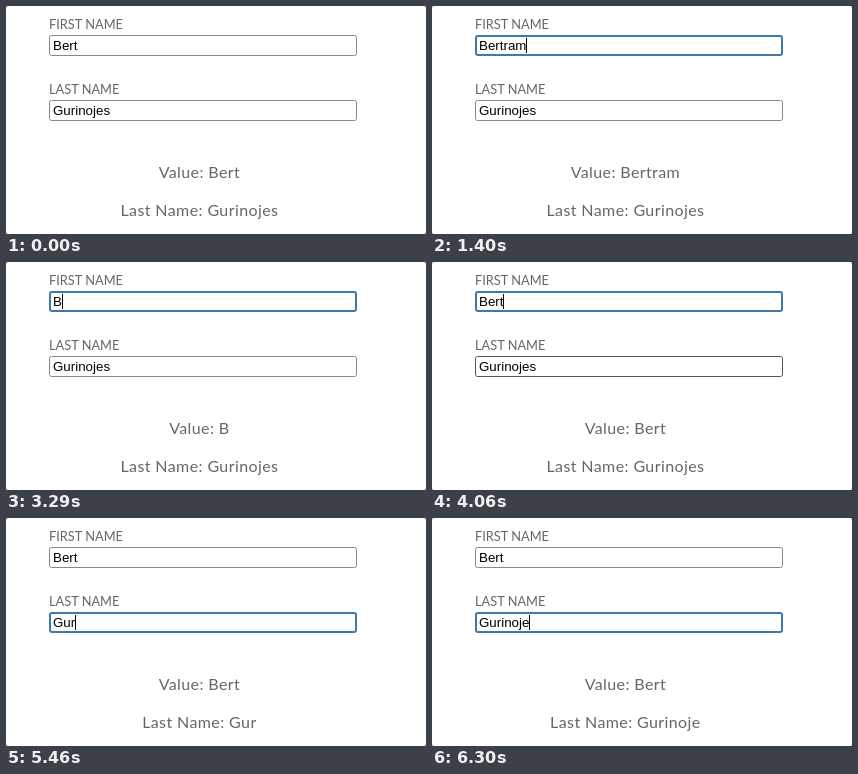
Write an HTML page that moves like this. It is 420 px wide and 228 px high and loops after 6.37 s.

```html
<!DOCTYPE html>
<html lang="en">
<head>
<meta charset="utf-8">
<title>Name form</title>
<style>
html, body { margin: 0; width: 100%; height: 100%; overflow: hidden; background: #999; }
svg { display: block; width: 420px; height: 228px; }
.label { font: 12.8px Lato, sans-serif; fill: #666; }
.value { font: 13.333px "Liberation Sans", Arial, sans-serif; fill: #000; white-space: pre; }
.result { font: 16px Lato, sans-serif; letter-spacing: .4px; fill: #666; text-anchor: middle; }
.box { fill: #fff; stroke: #888; }
.box.pressed { stroke: #555; }
.box.focus { stroke: #4079a8; stroke-width: 2; }
.mark { fill: #c3dcf7; }
</style>
</head>
<body>
<svg id="stage" viewBox="0 0 420 228">
  <rect width="420" height="228" rx="2.5" fill="#fff"/>
</svg>
<script>
const LOOP = 6370;
const FIRST = "Bertram", LAST = "Gurinojes";
const stage = document.getElementById("stage");

function set(el, attrs) {
  for (const k in attrs) el.setAttribute(k, attrs[k]);
}

function add(tag, attrs, text = "") {
  const el = document.createElementNS("http://www.w3.org/2000/svg", tag);
  set(el, attrs);
  el.textContent = text;
  return stage.appendChild(el);
}

function field(label, top, resultY) {
  add("text", { class: "label", x: 43, y: top - 6 }, label);
  return {
    top,
    box: add("rect", { rx: 2 }),
    mark: add("rect", { class: "mark", x: 47, y: top + 3, height: 15 }),
    text: add("text", { class: "value", x: 47, y: top + 15 }),
    caret: add("rect", { y: top + 3, width: 1, height: 15 }),
    result: add("text", { class: "result", x: 193.4, y: resultY })
  };
}

const first = field("FIRST NAME", 29, 172);
const last = field("LAST NAME", 94, 210);

// Each step: start time, letters shown, state of the field
const firstSteps = [
  [0, 4, ""], [350, 4, "caret"], [840, 4, "focus"],
  [1120, 5, "caret"], [1330, 6, "caret"], [1400, 7, "caret"],
  [1960, 7, "focus"], [2450, 7, "caret"], [3010, 7, "focus"], [3080, 7, "select"],
  [3290, 1, "caret"], [3430, 2, "caret"], [3640, 3, "caret"], [3850, 4, "caret"],
  [4200, 4, ""]
];
const lastSteps = [
  [0, 9, ""], [4060, 9, "pressed"], [4200, 9, "caret"], [4480, 9, "select"],
  [4830, 1, "caret"], [5250, 2, "caret"], [5460, 3, "caret"], [5670, 4, "caret"],
  [5810, 5, "caret"], [6090, 6, "caret"], [6160, 7, "caret"], [6300, 8, "caret"]
];

function show(f, steps, name, title, t) {
  const [, count, state] = steps.filter(s => s[0] <= t).pop();
  const value = name.slice(0, count);
  const focused = state !== "" && state !== "pressed";
  const inset = focused ? 1 : 0.5;

  f.text.textContent = value;
  f.result.textContent = `${title}: ${value}`;
  const width = f.text.getComputedTextLength();

  set(f.box, {
    class: `box ${focused ? "focus" : state}`,
    x: 43 + inset, y: f.top + inset,
    width: 308 - 2 * inset, height: 21 - 2 * inset
  });
  set(f.mark, { width: state === "select" ? width : 0 });
  set(f.caret, {
    x: Math.round(47 + width - 0.1),
    visibility: state === "caret" ? "visible" : "hidden"
  });
}

function draw(now) {
  const t = now % LOOP;
  show(first, firstSteps, FIRST, "Value", t);
  show(last, lastSteps, LAST, "Last Name", t);
}

const start = performance.now();
function tick() {
  draw(performance.now() - start);
  requestAnimationFrame(tick);
}
tick();
</script>
</body>
</html>
```
